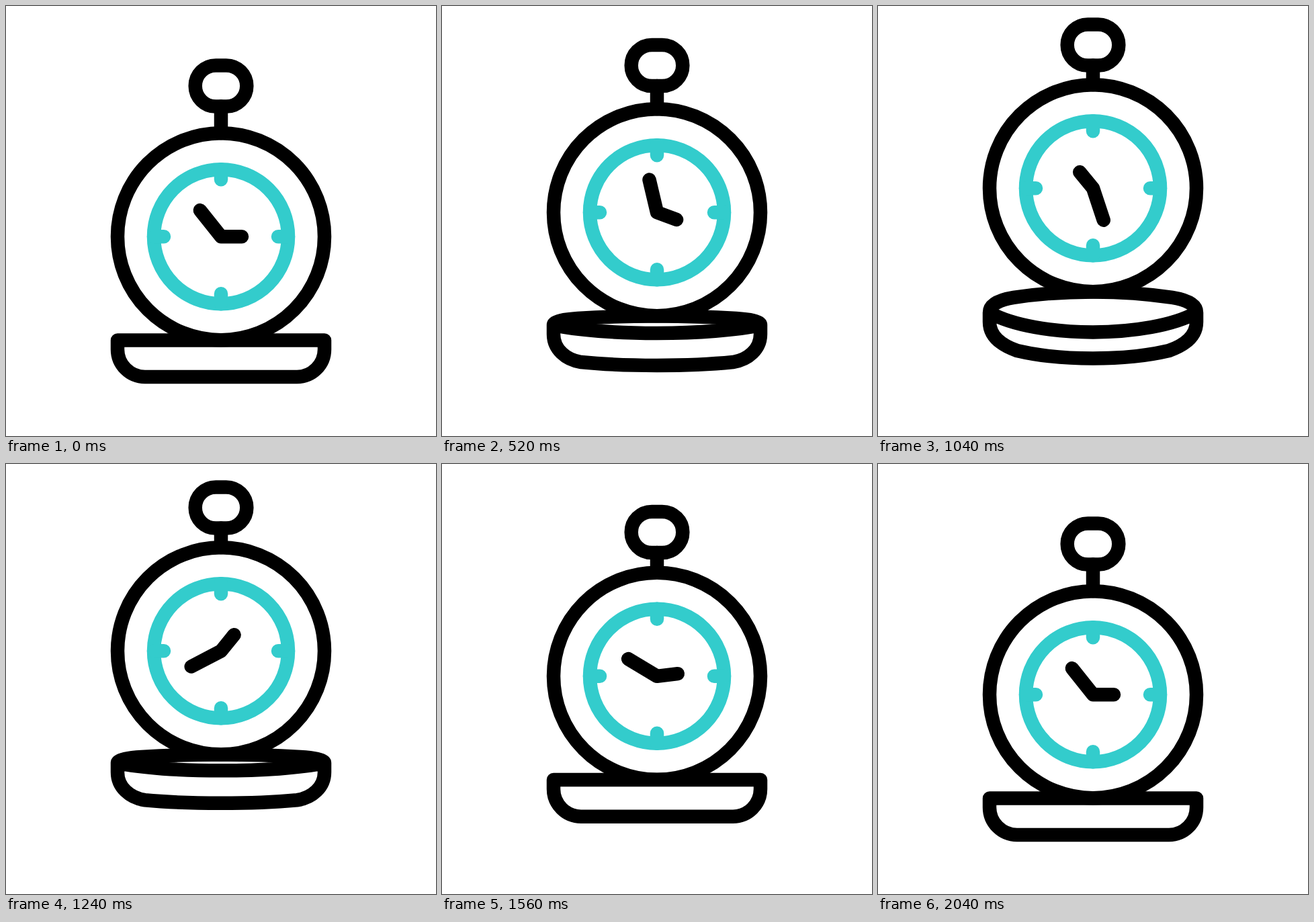
These frames come from a looping animation (640x640 px, 2080 ms). An HTML page:

```html
<!DOCTYPE html>
<html lang="en">
<head>
<meta charset="utf-8">
<title>Pocket watch</title>
<style>
  html, body { margin: 0; width: 100%; height: 100%; overflow: hidden; background: #fff; }
  svg { display: block; width: 100vw; height: 100vh; }
  g { fill: none; stroke: #000; stroke-width: 20.5; stroke-linecap: round; stroke-linejoin: round; }
  .dial { stroke: #3cc; }
</style>
</head>
<body>
<svg viewBox="0 0 640 640">
  <g>
    <path id="lid"/>
    <path id="stem"/>
    <rect id="ring" x="281.7" width="76.6" height="61.2" rx="30.6"/>
    <g id="watch">
      <circle r="154"/>
      <g class="dial">
        <circle r="100"/>
        <path d="M0-100V-85M0 100V85M-100 0H-85M100 0H85"/>
      </g>
      <path id="hands"/>
    </g>
  </g>
</svg>
<script>
const LOOP = 2080, STEP = 40;
const REST_Y = 343.2, REST_RING = 88.4;
const $ = id => document.getElementById(id);
const lid = $('lid'), stem = $('stem'), ring = $('ring'), watch = $('watch'), hands = $('hands');

// Eased progress from start to end; a and b are the x handles of the curve.
function ease(t, start, end, a = 1 / 3, b = 2 / 3) {
  const x = Math.min(1, Math.max(0, (t - start) / (end - start)));
  let lo = 0, hi = 1;
  for (let i = 0; i < 30; i++) {
    const s = (lo + hi) / 2, r = 1 - s;
    if (3 * a * s * r * r + 3 * b * s * s * r + s ** 3 < x) lo = s; else hi = s;
  }
  return lo * lo * (3 - 2 * lo);
}

const tip = (deg, len) => {
  const a = deg * Math.PI / 180;
  return `${len * Math.sin(a)} ${-len * Math.cos(a)}`;
};

// Lid outline below the watch centre y; k is how far it tilts open.
function lidPath(y, k) {
  const top = o => y + 154.2 + o * k;
  const side = y + 168 + 31 * k;
  const low = o => y + 208.8 + o * k;
  return `M166 ${top(31)}
    C166 ${top(18)} 183 ${top(11.5)} 202 ${top(8.5)}
    C238 ${top(3)} 278 ${top(0)} 320 ${top(0)}
    S402 ${top(3)} 438 ${top(8.5)}
    C457 ${top(11.5)} 474 ${top(18)} 474 ${top(31)}
    C440 ${top(50)} 380 ${top(60)} 320 ${top(60)}
    S200 ${top(50)} 166 ${top(31)}
    V${side}
    C166 ${side + 22.5} 184.5 ${low(25)} 207 ${low(33)}
    C245 ${low(42)} 283 ${low(44.5)} 320 ${low(44.5)}
    S395 ${low(42)} 433 ${low(33)}
    C455.5 ${low(25)} 474 ${side + 22.5} 474 ${side}
    V${top(31)}`;
}

function draw(t) {
  const rise = ease(t, 137, 903);
  const y = REST_Y - 72 * (rise - ease(t, 1078, 1908));
  const ringY = REST_RING - 61 * (rise - ease(t, 1085, 1820));
  const open = ease(t, 315, 770) - ease(t, 1055, 1380);
  const minute = -38.5 + 360 * ease(t, 40, 2040, 0.63, 0.318);
  const hour = 90 + 360 * ease(t, 130, 1810, 0.67, 0.314);

  watch.setAttribute('transform', `translate(320 ${y})`);
  ring.setAttribute('y', ringY);
  stem.setAttribute('d', `M320 ${ringY + 61.2}V${y - 154}`);
  lid.setAttribute('d', lidPath(y, open));
  hands.setAttribute('d', `M${tip(minute, 50)}L0 0L${tip(hour, 31)}`);
}

const begin = performance.now();
function tick() {
  const t = (performance.now() - begin) % LOOP;
  draw(Math.floor(t / STEP) * STEP);
  requestAnimationFrame(tick);
}
tick();
</script>
</body>
</html>
```
